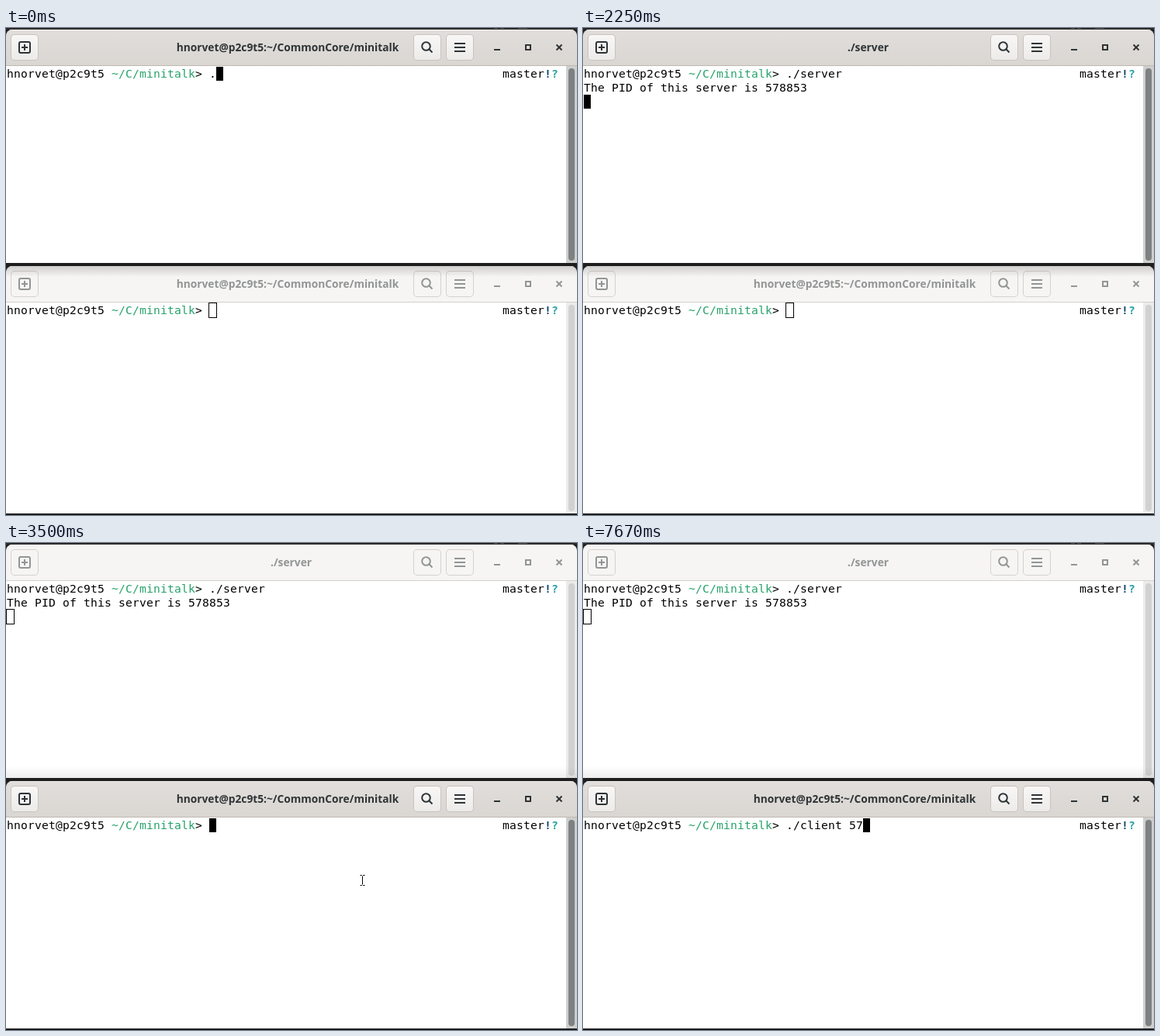
An HTML page with a canvas that plays this animation: 736x628 px, repeating every 8000 ms.

```html
<!DOCTYPE html>
<html>
<head>
<meta charset="utf-8">
<style>
html, body { margin: 0; width: 736px; height: 628px; overflow: hidden; background: #1e1e1e; }
canvas { display: block; }
</style>
</head>
<body>
<canvas id="stage" width="736" height="628"></canvas>
<script>
const ctx = document.getElementById('stage').getContext('2d');
const LOOP = 8000, FOCUS = 3330, BLINK = 585;
const CELL = 9, ROW = 18, PROMPT = 29;
const USER = 'hnorvet@p2c9t5';
const TITLE = USER + ':~/CommonCore/minitalk';

const serverKeys = [[0, '.'], [420, './'], [830, './s'], [1080, './se'], [1330, './ser'], [1420, './server ']];
const clientKeys = [[FOCUS, ''], [4170, '.'], [4670, './'], [5330, './c'], [5420, './cl'],
  [5750, './client '], [7330, './client 5'], [7670, './client 57']];
const ENTER = 2170, TITLE_CHANGE = 2250;

const clamp = v => Math.max(0, Math.min(1, v));
const hex = s => [1, 3, 5].map(i => parseInt(s.slice(i, i + 2), 16));
// k = 1 is the focused colour, k = 0 the backdrop colour
function mix(on, off, k) {
  const a = hex(on), b = hex(off);
  return `rgb(${a.map((v, i) => Math.round(b[i] + (v - b[i]) * k))})`;
}
const lastKey = (keys, t) => keys.filter(k => k[0] <= t).pop() || [0, ''];
const blinkOn = age => age % (2 * BLINK) < BLINK;

function rect(x, y, w, h, color) {
  ctx.fillStyle = color;
  ctx.fillRect(x, y, w, h);
}
function round(x, y, w, h, r, color) {
  ctx.fillStyle = color;
  ctx.beginPath();
  ctx.roundRect(x, y, w, h, r);
  ctx.fill();
}
function fade(y0, y1, from, to) {
  const g = ctx.createLinearGradient(0, y0, 0, y1);
  g.addColorStop(0, from);
  g.addColorStop(1, to);
  return g;
}
function line(...pts) {
  ctx.beginPath();
  for (let i = 0; i < pts.length; i += 2) ctx.lineTo(pts[i], pts[i + 1]);
  ctx.stroke();
}

function write(text, col, row, color = '#000', weight = 400) {
  ctx.font = weight + ' 14.667px "DejaVu Sans Mono", monospace';
  ctx.textAlign = 'left';
  ctx.fillStyle = color;
  [...text].forEach((c, i) => ctx.fillText(c, 1 + (col + i) * CELL, 64 + row * ROW));
}
function cursor(col, row, focused, on) {
  const x = 1 + col * CELL, y = 50 + row * ROW;
  if (!focused) {
    ctx.strokeStyle = '#000';
    ctx.lineWidth = 1;
    ctx.strokeRect(x - 0.5, y - 0.5, CELL + 1, ROW + 1);
  } else if (on) rect(x, y, CELL, ROW, '#000');
}

function button(x, k) {
  round(x, 8, 36, 34, 5, mix('#c9c3be', '#d5d1cd', k));
  round(x + 1, 9, 34, 32, 4, fade(9, 41, mix('#f8f7f6', '#f6f5f4', k), mix('#edebe9', '#f6f5f4', k)));
}

// snap: header state, which may differ from the fading buttons
function header(title, k, snap) {
  ctx.save();
  ctx.beginPath();
  ctx.roundRect(0, 2, 736, 47, [8, 8, 0, 0]);
  ctx.clip();
  rect(0, 2, 736, 46, fade(2, 48, mix('#e1dedb', '#f6f5f4', snap), mix('#dad6d2', '#f6f5f4', snap)));
  rect(0, 2, 736, 1, mix('#efedeb', '#f8f7f6', snap));
  rect(0, 48, 736, 1, mix('#bfb8b1', '#d5d0cc', snap));
  ctx.restore();

  const ink = mix('#2e3436', '#929595', k), bar = mix('#2e3436', '#929595', snap);
  [6, 525, 567].forEach(x => button(x, k));
  ctx.strokeStyle = ink;
  ctx.lineWidth = 2;
  ctx.beginPath();
  ctx.roundRect(17, 18, 14, 14, 2);
  ctx.stroke();
  line(24, 21, 24, 29);
  line(20, 25, 28, 25);
  ctx.beginPath();
  ctx.arc(541.5, 23.5, 5.3, 0, 7);
  ctx.stroke();
  line(545.3, 27.3, 549.5, 31.5);
  [20, 25, 30].forEach(y => line(578, y, 592, y));

  ctx.strokeStyle = bar;
  line(629, 28, 637, 28);
  ctx.strokeRect(670, 22, 6, 6);
  line(709.5, 21.5, 716.5, 28.5);
  line(716.5, 21.5, 709.5, 28.5);

  ctx.font = '700 13.75px "Open Sans", "Noto Sans", sans-serif';
  ctx.textAlign = 'center';
  ctx.fillStyle = bar;
  ctx.fillText(title, title === TITLE ? 363 : 367.5, 30);
}

function terminal(y, height, title, k, snap, command) {
  ctx.save();
  ctx.translate(0, y);
  header(title, k, snap);
  rect(0, 49, 722, height, '#fff');
  rect(722, 49, 14, height, mix('#cecece', '#ebebea', k));
  round(725, 52, 8, height - 6, 4, mix('#7e8182', '#d0d1d0', k));
  write(USER, 0, 0);
  write('~/C/minitalk', 15, 0, '#26a269');
  write('>', 27, 0);
  write(command, PROMPT, 0);
  write('master', 71, 0);
  write('!', 77, 0, '#12486b', 700);
  write('?', 78, 0, '#2aa1a3', 700);
}

function pointer(x, y) {
  for (const [w, color] of [[3, '#fff'], [1, '#000']]) {
    ctx.strokeStyle = color;
    ctx.lineWidth = w;
    line(x + 0.5, y - 5.5, x + 0.5, y + 5.5);
    for (const s of [-6.5, 6.5]) {
      line(x - 2.5, y + s, x - 0.2, y + s);
      line(x + 1.2, y + s, x + 3.5, y + s);
    }
  }
}

function draw(t) {
  const clientFocused = t >= FOCUS;
  const k = clientFocused ? clamp((t - 3290) / 200) : 0;
  rect(0, 0, 736, 628, '#1e1e1e');
  rect(0, 0, 736, 2, '#2b2a2a');
  [[629, 5], [637, 5], [660, 12]].forEach(([x, w]) => rect(x, 0, w, 1, '#555'));

  const [typed, command] = lastKey(serverKeys, t);
  const running = t >= ENTER;
  terminal(0, 254, t >= TITLE_CHANGE ? './server' : TITLE, 1 - k, 1 - k, command);
  if (running) write('The PID of this server is 578853', 0, 1);
  const age = t - (running ? ENTER : typed);
  cursor(running ? 0 : PROMPT + command.length, running ? 2 : 0, !clientFocused, blinkOn(age));
  rect(0, 288, 736, 15, fade(288, 303, 'rgba(0,0,0,0)', `rgba(0,0,0,${0.07 * k})`));
  ctx.restore();

  const [pressed, input] = lastKey(clientKeys, t);
  terminal(305, 272, TITLE, k, clientFocused ? 1 : 0, input);
  cursor(PROMPT + input.length, 0, clientFocused, blinkOn(t - pressed));
  ctx.beginPath();
  ctx.roundRect(0, 2, 736, 46, [8, 8, 0, 0]);
  ctx.fillStyle = fade(2, 16, `rgba(0,0,0,${0.16 * (1 - k)})`, 'rgba(0,0,0,0)');
  ctx.fill();
  ctx.restore();

  if (t >= 3000 && t < 4170) {
    const left = (1 - clamp((t - 3000) / 250)) ** 2;
    pointer(459 + 11 * left, 434 + clamp((t - 3250) / 80) - 180 * left);
  }
}

function frame(now) {
  draw(now % LOOP);
  requestAnimationFrame(frame);
}
requestAnimationFrame(frame);
</script>
</body>
</html>
```
